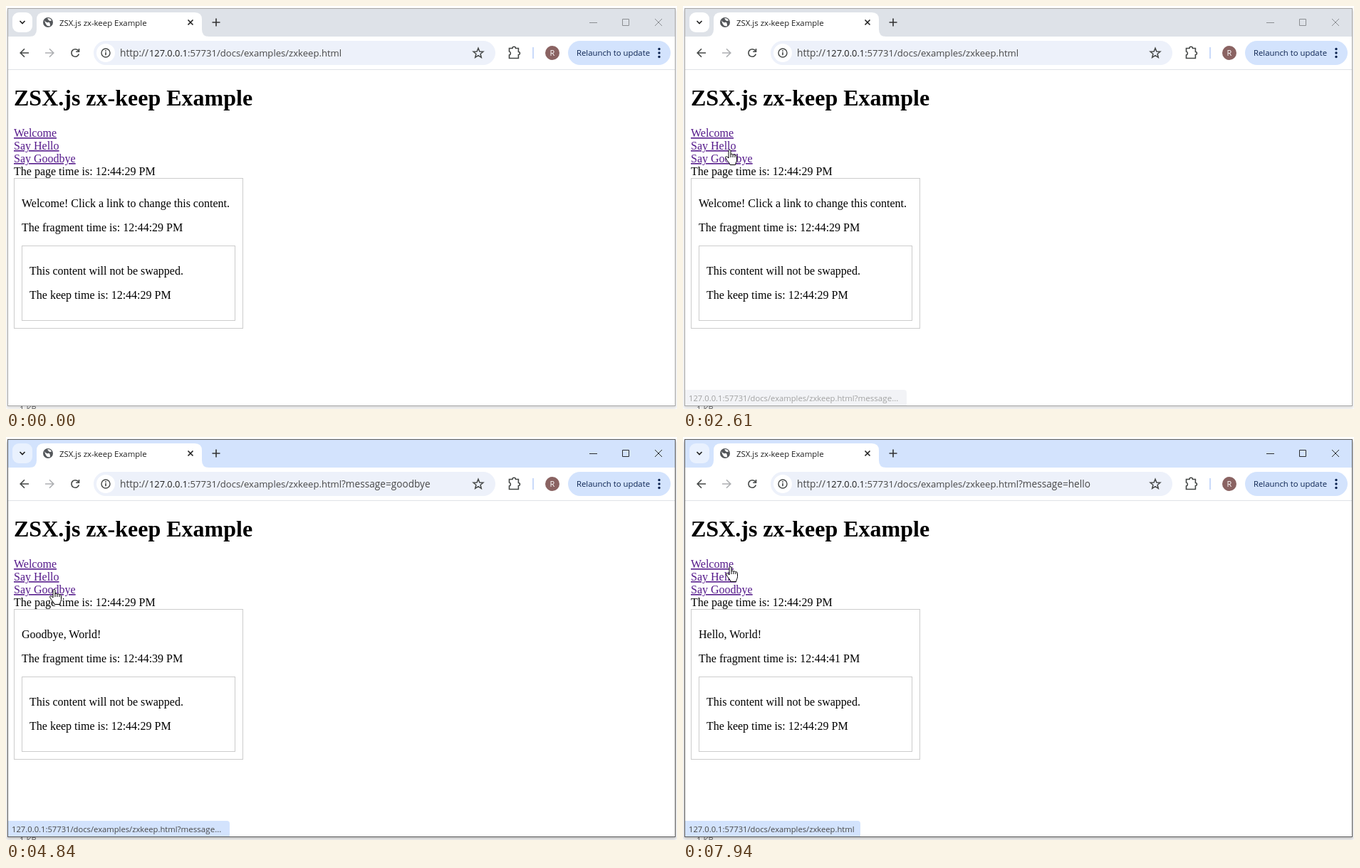
These frames come from a looping animation (942 px wide and 567 px high, 8 s). An HTML page:

```html
<!DOCTYPE html>
<html lang="en">
<head>
<meta charset="utf-8">
<title>Browser demo</title>
<style>
  html, body { margin: 0; width: 100%; height: 100%; overflow: hidden; background: #fff; }
  svg { display: block; width: 942px; height: 567px; }
  text { white-space: pre; }
  .ui { font-family: "Open Sans", "Noto Sans", sans-serif; font-size: 11.4px; fill: #1f1f1f; }
  .url { font-size: 13.1px; fill: #474747; }
  .page { font: 16px "Liberation Serif", "Times New Roman", serif; fill: #000; }
  .link { fill: #551a8b; text-decoration: underline; }
  .line { fill: none; stroke: #444746; stroke-width: 1.6; }
  .box { fill: none; stroke: #ccc; }
  #win { --bar: #dee2e8; --button: #fff; --control: #8b8e92; --edge: #a6a6a6; --bubble: #e6e9ee; --shade: .14; }
  #win.active { --bar: #d3e3fd; --button: #e9f1fe; --control: #2b2d30; --edge: #5c5c5c; --bubble: #d3e3fd; --shade: .24; }
  #shadow { fill: #000; opacity: var(--shade); }
  #frame { fill: #fff; stroke: var(--edge); }
  #titlebar { fill: var(--bar); }
  #search { fill: var(--button); }
  #controls { fill: none; stroke: var(--control); }
  #bubble { fill: var(--bubble); }
  #status text { font-size: 11.22px; fill: #474747; }
  #statusQuery { font-size: 11.6px; }
  .cursor { fill: #fff; stroke: #000; stroke-linejoin: round; }
</style>
</head>
<body>
<svg viewBox="0 0 942 567">
  <defs><filter id="blur" x="-5%" y="-5%" width="110%" height="110%"><feGaussianBlur stdDeviation="2"/></filter></defs>
  <text class="ui" x="19" y="571" style="fill:#666">1 KB</text>
  <g id="win">
    <rect id="shadow" x="1" y="5" width="940" height="561" filter="url(#blur)"/>
    <rect id="frame" x="2.5" y="3.5" width="937" height="559"/>

    <!-- title bar -->
    <rect id="titlebar" x="3" y="4" width="936" height="39"/>
    <rect id="search" x="9" y="9" width="28" height="28" rx="9"/>
    <path class="line" d="M19.5 21l3.5 3.5 3.5-3.5" style="stroke:#1f1f1f"/>
    <path d="M33 43q10 0 10-10V19q0-10 10-10H265q10 0 10 10V33q0 10 10 10Z" fill="#fff"/>
    <circle cx="59" cy="23" r="7" fill="#54575b"/>
    <path d="M54 20q2 4 5 3t3 5q-3 1-5-1t-3-7ZM58 17.5q4-1 6 3-3 1-4-.5t-2-2.5Z" fill="#fff"/>
    <text class="ui" x="75" y="28">ZSX.js zx-keep Example</text>
    <path class="line" d="M255.5 19.5l7 7m0-7l-7 7" style="stroke:#1f1f1f"/>
    <path class="line" d="M289.5 23h11M295 17.5v11" style="stroke:#333"/>
    <path id="controls" d="M819 23.5h11M865.5 18.5h9v9h-9ZM911 18l10 10m0-10l-10 10"/>

    <!-- toolbar -->
    <path d="M3 89.5H939" stroke="#dfe2e7"/>
    <path class="line" d="M32 66H20.5M26 60.2L20.2 66l5.8 5.8"/>
    <path class="line" d="M55 66h11.500M61 60.200L66.800 66 61 71.800" style="stroke:#adafb2"/>
    <path class="line" d="M101.600 63A5.300 5.300 0 1 0 102.300 67.500M102.500 60v4.200h-4.300"/>
    <rect x="123" y="49" width="564" height="34" rx="17" fill="#edf1fa"/>
    <circle cx="140" cy="66" r="13" fill="#fff"/>
    <circle class="line" cx="140" cy="66" r="6" style="stroke-width:1.400"/>
    <path class="line" d="M140 65v4.200M140 62.300v1.600"/>
    <text class="ui url" x="160" y="71" style="font-size:13.700px">http://</text>
    <text class="ui url" x="201" y="71" style="font-size:12.800px;fill:#1f1f1f">127.0.0.1</text>
    <text class="ui url" x="255" y="71">:57731/docs/examples/zxkeep.html</text>
    <text class="ui url" x="471" y="71" style="font-size:13.650px" id="urlQuery"></text>
    <path class="line" id="star" style="stroke-width:1.500"/>
    <path class="line" d="M706.500 59.500h4.500a2.200 2.200 0 0 1 4.400 0h4v5a2 2 0 0 1 0 4v5h-12.900v-4.500a2.600 2.600 0 0 0 0-5Z"/>
    <path d="M740 58v16" stroke="#c9dafa" stroke-width="2"/>
    <circle cx="767" cy="66" r="10" fill="#8a6362"/>
    <text class="ui" x="767" y="70" text-anchor="middle" style="fill:#fff;font-size:11px">R</text>
    <rect x="789" y="49" width="144" height="34" rx="17" fill="#d3e3fd"/>
    <text class="ui" x="801" y="70" style="fill:#0b2350;font-size:11.330px">Relaunch to update</text>
    <g fill="#0b2350"><circle cx="917" cy="60.500" r="1.700"/><circle cx="917" cy="66" r="1.700"/><circle cx="917" cy="71.500" r="1.700"/></g>

    <!-- page -->
    <g class="page">
      <text x="11" y="140" style="font-size:32px;font-weight:bold">ZSX.js zx-keep Example</text>
      <text class="link" x="11" y="184">Welcome</text>
      <text class="link" x="11" y="202">Say Hello</text>
      <text class="link" x="11" y="220">Say Goodbye</text>
      <text x="11" y="238">The page time is: 12:44:29 PM</text>
      <rect class="box" x="11.500" y="242.500" width="321" height="211"/>
      <text x="22" y="283" id="greeting"></text>
      <text x="22" y="317" id="fragment"></text>
      <rect class="box" x="22.500" y="337.500" width="299" height="105"/>
      <text x="33" y="378">This content will not be swapped.</text>
      <text x="33" y="412">The keep time is: 12:44:29 PM</text>
    </g>

    <g id="status">
      <path id="bubble"/>
      <text class="ui" x="8" y="556">127.0.0.1:57731/docs/examples/zxkeep.html<tspan id="statusQuery"></tspan></text>
    </g>
  </g>

  <g id="pointer">
    <path id="arrow" class="cursor" d="M.5.5V16.500L4.300 13 7 18.800 9.400 17.800 7 12.200H12Z"/>
    <g id="hand" class="cursor" transform="translate(-6)">
      <path d="M5 1.500C5 .2 8 .2 8 1.500V7C8 5.800 11 6 11 7.500 11 6.500 14 6.700 14 8.300 14 7.500 16.500 7.600 16.500 9.500V14.500C16.500 17 15 18 14.500 21.500H7C6.500 19 4 17 2.500 14.500 1 12 .5 11.500.5 10.500 1.500 9.200 3 9.800 5 12Z"/>
      <path d="M8 7v4M11 7.500V11M14 8.500V11" fill="none"/>
    </g>
    <circle id="press" cx="0" cy="1" r="11.500" fill="#ffe900" fill-opacity=".6"/>
  </g>
</svg>
<script>
const LOOP = 8000, STEP = 70;
const $ = id => document.getElementById(id);

// Cursor tip moves: start, steps, from, to
const moves = [
  [840, 12, [893, 560], [490, 325]],
  [1680, 12, [490, 325], [65, 202]],
  [2950, 1, [65, 202], [64, 201]],
  [3760, 5, [64, 201], [67, 214]],
  [5710, 5, [67, 214], [65, 199]],
  [7530, 6, [65, 199], [66, 182]],
];
// Page content: start, query, greeting, seconds
const pages = [
  [0, "", "Welcome! Click a link to change this content.", 29],
  [3230, "?message=hello", "Hello, World!", 37],
  [4840, "?message=goodbye", "Goodbye, World!", 39],
  [6850, "?message=hello", "Hello, World!", 41],
];
// Link bubble: start, query, right edge, opacity
const bubbles = [
  [0, "", 3, 0],
  [2610, "?message...", 314, .5],
  [2680, "?message...", 314, .8],
  [2750, "?message...", 314, 1],
  [3900, "?message...", 314, .6],
  [3970, "?message...", 314, 1],
  [5570, "?message=go...", 334, 1],
  [5640, "?message=goodbye", 350, 1],
  [5710, "?message=goodbye", 356, 1],
  [5850, "?message=goodbye", 356, .6],
  [5920, "?message=hello", 334, .8],
  [5990, "?message=hello", 334, 1],
  [7740, "", 249, 1],
];
const presses = [[2950, 3200], [4700, 4770], [6780, 6850]];

const rowAt = (rows, t) => rows.filter(row => row[0] <= t).pop();
const ease = p => p * p * (3 - 2 * p);
const show = (id, on) => $(id).style.display = on ? "" : "none";

function drawCursor(t) {
  const move = rowAt(moves, t);
  show("pointer", move);
  if (!move) return;
  const [start, steps, from, to] = move;
  const p = ease(Math.min(1, (Math.floor((t - start) / STEP) + 1) / steps));
  const [x, y] = from.map((v, i) => Math.round(v + (to[i] - v) * p));
  const overLink = x < 98 && y < 222;
  $("pointer").setAttribute("transform", `translate(${x} ${y})`);
  show("hand", overLink);
  show("arrow", !overLink);
  show("press", presses.some(([on, off]) => t >= on && t < off));
}

function render(t) {
  $("win").classList.toggle("active", t >= 3020);
  const [, query, greeting, seconds] = rowAt(pages, t);
  $("urlQuery").textContent = query;
  $("greeting").textContent = greeting;
  $("fragment").textContent = `The fragment time is: 12:44:${seconds} PM`;

  const [, hint, right, opacity] = rowAt(bubbles, t);
  $("statusQuery").textContent = hint;
  $("bubble").setAttribute("d", `M3 540H${right - 4}q4 0 4 4V562H3Z`);
  $("status").setAttribute("opacity", opacity);
  drawCursor(t);
}

const starPoints = Array.from({ length: 10 }, (_, i) => {
  const r = i % 2 ? 3.2 : 7.3, a = i * Math.PI / 5;
  return `${663 + r * Math.sin(a)} ${66.5 - r * Math.cos(a)}`;
});
$("star").setAttribute("d", `M${starPoints.join("L")}Z`);

const begin = performance.now();
function tick() {
  render((performance.now() - begin) % LOOP);
  requestAnimationFrame(tick);
}
tick();
</script>
</body>
</html>
```
